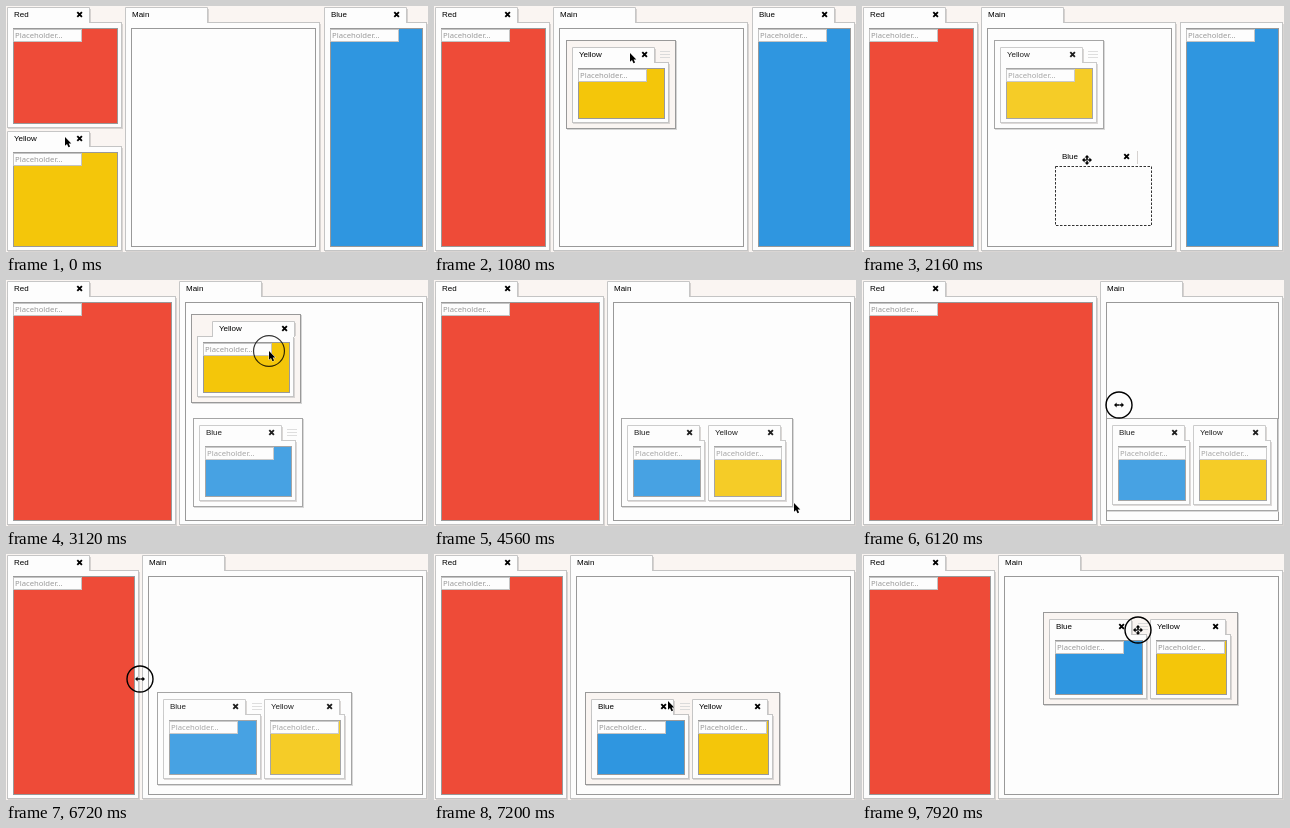
These frames come from a looping animation (422x246 px, 8 s). An HTML page:

```html
<!DOCTYPE html>
<html lang="en">
<head>
<meta charset="utf-8">
<title>Dock panels</title>
<style>
html, body { margin: 0; width: 100%; height: 100%; overflow: hidden; background: #faf5f2; }
svg { display: block; }
.label { font: 8px "Liberation Sans", Arial, sans-serif; fill: #000; }
.hint { font: 7.7px "Noto Sans", "Open Sans", sans-serif; fill: #999; }
</style>
</head>
<body>
<svg id="stage" width="422" height="246" viewBox="0 0 422 246"></svg>
<script>
const LOOP = 8000;
const WHITE = '#fdfdfd';
const stage = document.getElementById('stage');
const colors = { Red: '#ee4b38', Yellow: '#f4c60a', Blue: '#2f96e0', Main: WHITE };

// Pointer path: time, x, y
const path = [
  [0, 59, 131], [150, 59, 131], [840, 196, 47], [1100, 196, 47],
  [1680, 351, 10], [1800, 351, 10], [2130, 225, 154], [2450, 225, 154],
  [2850, 248, 50], [2960, 248, 50], [3120, 263, 71], [3600, 283, 196],
  [4100, 283, 196], [4530, 360, 223], [4650, 360, 223], [5300, 383, 227],
  [5400, 383, 227], [5700, 171, 125], [5800, 171, 125], [6080, 257, 125],
  [6180, 257, 125], [6700, 134, 125], [6800, 134, 125], [7190, 234, 147],
  [7320, 246, 156], [7420, 246, 156], [7910, 276, 76], [8000, 276, 76]
];

// Tab drags: start, end, name, grab offset
const drags = [
  [180, 1000, 'Yellow', 58, 6],
  [1860, 2350, 'Blue', 32, 9],
  [3200, 4070, 'Yellow', 57, 9]
];

// Button presses: start, end
const presses = [[120, 180], [1800, 1860], [2940, 3080], [4650, 5350], [5750, 6750], [7380, 8000]];

const within = (t, a, b) => t >= a && t < b;
const clamp = (v, a, b) => Math.max(a, Math.min(b, v));

function pointer(t) {
  const i = Math.max(1, path.findIndex(k => k[0] > t));
  const [a, b] = [path[i - 1], path[i]];
  const u = (t - a[0]) / (b[0] - a[0]);
  const e = u * u * (3 - 2 * u);
  return [1, 2].map(n => Math.round(a[n] + (b[n] - a[n]) * e));
}

// A one-pixel outline that stays inside the given box
const rect = (x, y, w, h, fill, stroke, extra = '') =>
  `<rect x="${x + .5}" y="${y + .5}" width="${Math.max(0, w - 1)}" height="${Math.max(0, h - 1)}" fill="${fill}" stroke="${stroke}" ${extra}/>`;
const line = (d, color, width = 1) =>
  `<path d="${d}" fill="none" stroke="${color}" stroke-width="${width}"/>`;
const text = (x, y, kind, s) => `<text x="${x}" y="${y}" class="${kind}">${s}</text>`;
const dashed = (x, y, w, h) =>
  rect(x, y, w, h, WHITE, '#333', 'fill-opacity=".65" stroke-dasharray="2.5 1.5"');

function tab(x, y, w, name, border = '#c6c6c6') {
  const r = x + w;
  let out = line(`M${r + .5} ${y + 2}v13`, '#d6d2d0') +
    `<path d="M${x + .5} ${y + 16}v-15.5h${w - 1}v15.5" fill="${WHITE}" stroke="${border}"/>` +
    text(x + 7, y + 10, 'label', name);
  if (name !== 'Main')
    out += line(`M${r - 12.7} ${y + 5.2}l4.6 4.6m0-4.6l-4.6 4.6`, '#000', 1.9);
  return out;
}

function panel(x, y, w, h, name, { shift = 0, hidden = false, grip = false } = {}) {
  let out = rect(x + 1, y + 17, w, h - 16, '#d9d5d3', '#d9d5d3') +
    rect(x, y + 15, w, h - 15, WHITE, '#c4c4c4');
  if (grip && w > 90)
    out += line(`M${x + w - 9} ${y + 4.5}h10m-10 3h10m-10 3h10`, '#dadada');
  if (!hidden) out += tab(x + shift, y, Math.min(83, w - 5), name);
  out += rect(x + 6, y + 21, w - 10, h - 25, colors[name], '#999');
  if (name !== 'Main')
    out += rect(x + 6, y + 22, Math.min(69, w - 10), 13, WHITE, '#c4c4c4') +
      text(x + 8, y + 31, 'hint', 'Placeholder...');
  return out;
}

function floating(x, y, w, h, hover, inner) {
  return `<g opacity="${hover ? 1 : .88}">` +
    rect(x + 1, y, w, h + 1, '#d4d4d4', '#d4d4d4') +
    rect(x, y - 1, w, h + 1, hover ? '#faf5f2' : WHITE, '#999') + inner + '</g>';
}

function cursor(x, y, kind) {
  const arms = { move: [0, 90, 180, 270], ew: [0, 180], nwse: [45, 225] }[kind];
  const shape = arms
    ? arms.map(a => `<path transform="rotate(${a})" d="M0-.8H2.4V-2.4L5 0L2.4 2.4V.8H0z"/>`).join('')
    : '<path d="M0 0V8.8L2 7L3.5 10.2L5.1 9.4L3.7 6.4H6.3z"/>';
  return `<g transform="translate(${x} ${y})" stroke="#fff" stroke-width=".8" paint-order="stroke">${shape}</g>`;
}

// Ring around a pressed pointer; it widens and fades after release
function ring(x, y, t) {
  const press = presses.find(p => within(t, p[0], p[1] + 200));
  if (!press) return '';
  const u = Math.max(0, t - press[1]) / 200;
  return `<circle cx="${x}" cy="${y}" r="${13 + 12 * u}" fill="none" stroke="#000" stroke-width="${1.4 - u}" opacity="${1 - u}"/>`;
}

function draw(t) {
  const [cx, cy] = pointer(t);
  const drag = drags.find(d => within(t, d[0], d[1]));
  const dragging = name => !!drag && drag[2] === name;
  const over = (x, y, w, h) => !drag && cx >= x && cx < x + w && cy >= y && cy < y + h;
  const yellowDocked = t < 1000, blueDocked = t < 2350, merged = t >= 4070;

  // Docked panels
  let left = blueDocked ? 119 : 173;
  if (t >= 5750) left = t < 6750 ? clamp(cx + 2, 136, 238) : 136;
  const right = blueDocked ? 314 : 421;
  let out = panel(1, 1, left - 4, yellowDocked ? 121 : 244, 'Red');
  if (yellowDocked)
    out += panel(1, 125, left - 4, 120, 'Yellow', { hidden: dragging('Yellow') });
  out += panel(left, 1, right - left, 244, 'Main');
  if (blueDocked)
    out += panel(318, 1, 103, 244, 'Blue', { hidden: dragging('Blue') });

  // Floating windows
  const single = (x, y, name, shift = 0) =>
    floating(x, y, 110, 88, over(x, y, 110, 88),
      panel(x + 6, y + 6, 97, 76, name, { shift, hidden: dragging(name), grip: true }));
  if (!yellowDocked && !merged)
    out += single(left + (blueDocked ? 13 : 12), 35, 'Yellow',
      within(t, 2960, 3200) ? clamp(cx - 248, 0, 15) : 0);
  if (!blueDocked && !merged) out += single(187, 139, 'Blue');
  if (merged) {
    const room = 417 - left - 6;
    const grow = t < 4650 ? 0 : t < 5350 ? cx - 360 : 23;
    const w = Math.min(172 + grow, room - 1);
    const h = 88 + (t < 4650 ? 0 : t < 5350 ? cy - 223 : 4);
    let x = left + 6 + Math.min(t < 5750 ? 8 : 9, room - w - 1), y = 139;
    if (t >= 7380) { x = cx - 95; y = cy - 17; }
    const blue = 78 + Math.round((w - 172) * 20 / 23);
    out += floating(x, y, w, h, over(x, y, w, h),
      panel(x + 6, y + 6, blue, h - 12, 'Blue', { grip: true }) +
      panel(x + blue + 9, y + 6, w - 16 - blue, h - 12, 'Yellow', { grip: true }));
  }

  // Dragged tab and drop zone
  if (drag) {
    const x = cx - drag[3], y = cy - drag[4];
    if (cx < 119) out += dashed(1, 140, 115, 104);
    else if (blueDocked && cx > 317) out += dashed(318, 16, 102, 228);
    else if (t > 3200 && cy > 139) out += dashed(242, 160, 48, 60);
    else out += dashed(x, y + 15, 97, 60);
    out += tab(x, y - 2, 82, drag[2], 'none');
  }

  const kind = drag || t >= 7380 ? 'move'
    : within(t, 5680, 6780) ? 'ew'
    : within(t, 4600, 5400) ? 'nwse' : 'arrow';
  stage.innerHTML = out + ring(cx, cy, t) + cursor(cx, cy, kind);
}

function frame() {
  draw(performance.now() % LOOP);
  requestAnimationFrame(frame);
}
frame();
</script>
</body>
</html>
```
